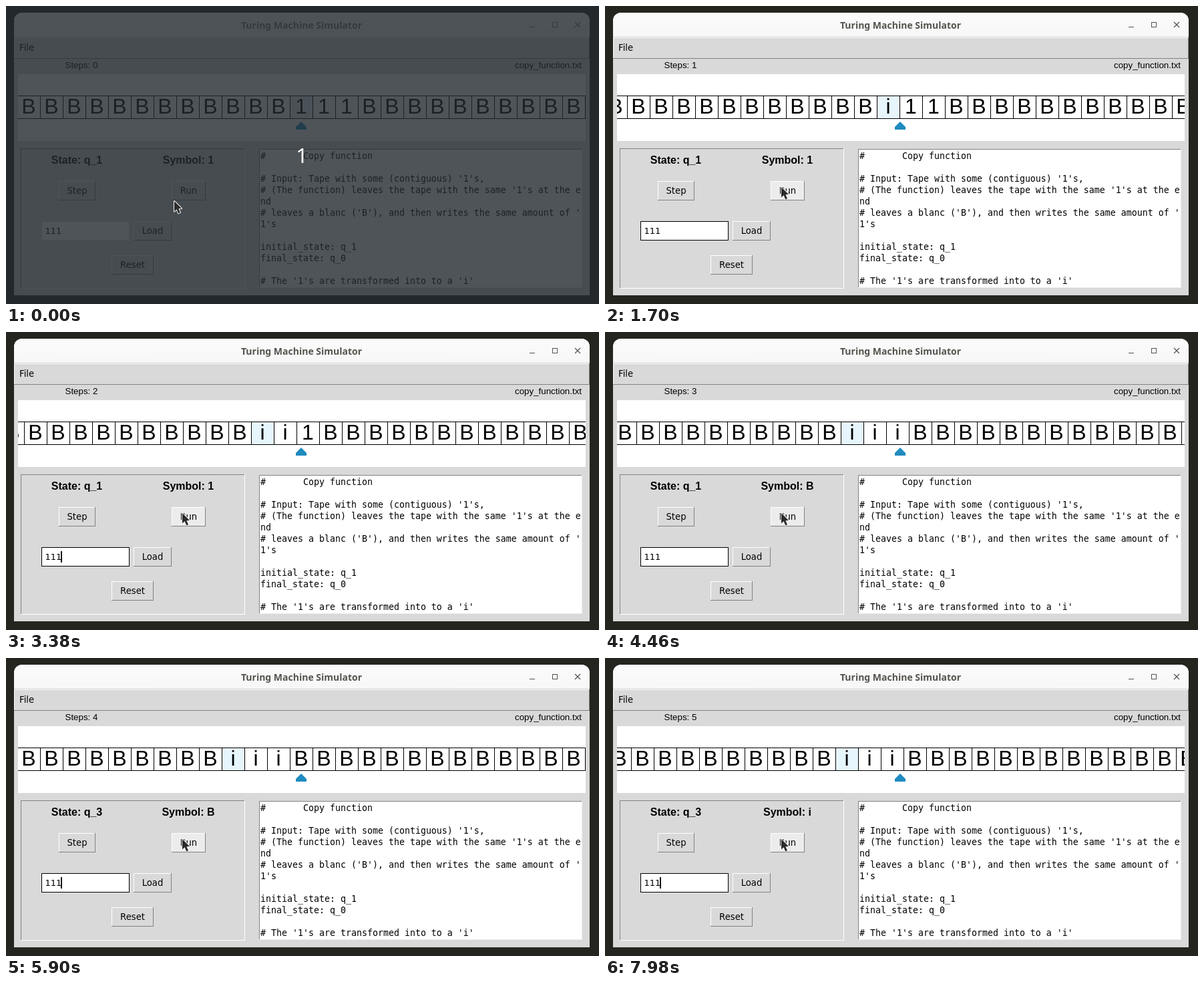
These frames come from a looping animation (888x446 px, 8000 ms). An HTML page with a canvas:

```html
<!DOCTYPE html>
<html lang="en">
<head>
<meta charset="utf-8">
<title>Turing Machine Simulator</title>
<style>
  html, body { margin: 0; width: 100%; height: 100%; overflow: hidden; background: #24251f; }
  canvas { display: block; }
</style>
</head>
<body>
<canvas id="stage" width="888" height="446"></canvas>
<script>
const ctx = document.getElementById('stage').getContext('2d');
const LOOP = 8000;
const FACE = '#d9d9d9', SHADE = '#828282', LIGHT = '#ffffff';
const SANS = '"Liberation Sans", sans-serif';
const UI = '13.2px "DejaVu Sans", sans-serif';
const MONO = '13.29px "DejaVu Sans Mono", monospace';
const CELL = 34, HEAD_LEFT = 425;

const PROGRAM = [
  '#       Copy function',
  '',
  "# Input: Tape with some (contiguous) '1's,",
  "# (The function) leaves the tape with the same '1's at the e",
  'nd',
  "# leaves a blanc ('B'), and then writes the same amount of '",
  "1's",
  '',
  'initial_state: q_1',
  'final_state: q_0',
  '',
  "# The '1's are transformed into to a 'i'"
];

// Each machine step: when the labels change, when the tape starts, its direction.
const STEPS = [
  { at: 1280, roll: 1240, dir: -1, state: 'q_1', symbol: '1' },
  { at: 2820, roll: 2780, dir: -1, state: 'q_1', symbol: '1' },
  { at: 4360, roll: 4340, dir: -1, state: 'q_1', symbol: 'B' },
  { at: 5900, roll: 5900, dir: 0, state: 'q_3', symbol: 'B' },
  { at: 7440, roll: 7430, dir: 1, state: 'q_3', symbol: 'i' }
];

const clamp = (v, lo, hi) => Math.min(hi, Math.max(lo, v));

function rect(x, y, w, h, color) {
  ctx.fillStyle = color;
  ctx.fillRect(x, y, w, h);
}

function text(str, x, y, font, color = '#000', align = 'left') {
  ctx.font = font;
  ctx.fillStyle = color;
  ctx.textAlign = align;
  ctx.fillText(str, x, y);
}

function polygon(points, color) {
  ctx.beginPath();
  points.forEach(([x, y]) => ctx.lineTo(x, y));
  ctx.closePath();
  ctx.fillStyle = color;
  ctx.fill();
}

// Box with one-pixel relief edges.
function relief(x, y, w, h, face, topLeft, bottomRight) {
  rect(x, y, w, h, bottomRight);
  rect(x, y, w - 1, h - 1, topLeft);
  rect(x + 1, y + 1, w - 2, h - 2, face);
}

function button(label, x, y, w, h, hover = false, pressed = false) {
  const edges = pressed ? [SHADE, LIGHT] : [LIGHT, SHADE];
  const shift = pressed ? 1 : 0;
  relief(x, y, w, h, hover ? '#ececec' : FACE, ...edges);
  text(label, x + w / 2 + shift, y + 19 + shift, UI, '#000', 'center');
}

function drawWindow(focused) {
  rect(0, 0, 888, 446, '#24251f');
  ctx.beginPath();
  ctx.roundRect(12, 10, 862, 423, [12, 12, 0, 0]);
  ctx.fillStyle = FACE;
  ctx.fill();

  const bar = ctx.createLinearGradient(0, 10, 0, 46);
  bar.addColorStop(0, '#fbfbfb');
  bar.addColorStop(1, '#f7f7f7');
  ctx.beginPath();
  ctx.roundRect(12, 10, 862, 36, [12, 12, 0, 0]);
  ctx.fillStyle = bar;
  ctx.fill();
  rect(12, 46, 862, 1, '#cfcfcf');

  const ink = focused ? '#55534e' : '#7c7b78';
  text('Turing Machine Simulator', 442.5, 34, 'bold 14px "Noto Sans", sans-serif', ink, 'center');
  rect(784, 31, 8, 1, ink);
  ctx.strokeStyle = ink;
  ctx.lineWidth = 1;
  ctx.strokeRect(818.5, 24.5, 7, 7);
  ctx.lineWidth = 1.2;
  ctx.beginPath();
  ctx.moveTo(852, 24); ctx.lineTo(860, 32);
  ctx.moveTo(860, 24); ctx.lineTo(852, 32);
  ctx.stroke();

  relief(12, 47, 862, 32, FACE, LIGHT, SHADE);
  text('File', 20, 67, UI);
}

function drawTape(written, offset) {
  rect(18, 102, 850, 100, '#fff');
  ctx.save();
  ctx.beginPath();
  ctx.rect(18, 102, 850, 100);
  ctx.clip();
  for (let i = -15; i <= 18; i++) {
    const x = HEAD_LEFT + i * CELL + offset;
    if (i === 0) rect(x, 134, CELL, 34, '#e7f5fc');
    rect(x, 134, 1, 35, '#000');
    const symbol = i < 0 || i > 2 ? 'B' : i < written ? 'i' : '1';
    text(symbol, x + 17, 161, '32px ' + SANS, '#000', 'center');
  }
  rect(18, 134, 850, 1, '#000');
  rect(18, 168, 850, 1, '#000');
  ctx.restore();
  polygon([[442, 173], [450, 181], [450, 185], [434, 185], [434, 181]], '#1f8bbf');
}

function drawControls(state, symbol, focused, caret, hover, pressed) {
  relief(22, 213, 336, 210, FACE, SHADE, LIGHT);
  const bold = 'bold 16px ' + SANS;
  text('State: ' + state, 106, 236, bold, '#000', 'center');
  text('Symbol: ' + symbol, 273, 236, bold, '#000', 'center');
  button('Step', 79, 262, 55, 29);
  button('Run', 248, 262, 51, 29, hover, pressed);
  rect(53, 322, 132, 29, focused ? '#000' : FACE);
  rect(54, 323, 130, 27, '#fff');
  text('111', 58.5, 341, '13px "DejaVu Sans", sans-serif');
  if (caret) rect(82, 328, 2, 17, '#000');
  button('Load', 191, 322, 57, 29);
  button('Reset', 158, 373, 63, 29);
}

function drawProgram() {
  relief(379, 214, 484, 208, '#fff', SHADE, '#ececec');
  PROGRAM.forEach((line, i) => text(line, 381, 229 + i * 17, MONO));
}

function drawCountdown(opacity) {
  ctx.globalAlpha = opacity;
  rect(0, 0, 888, 446, 'rgba(36, 42, 48, 0.8)');
  text('1', 443, 235, '31px "Noto Sans", sans-serif', '#fff', 'center');
  ctx.globalAlpha = 1;
}

function drawCursor(x, y) {
  ctx.save();
  ctx.translate(x, y);
  ctx.lineJoin = 'round';
  ctx.lineWidth = 2;
  ctx.strokeStyle = '#f4f4f4';
  const arrow = [[0, 0], [0, 15.5], [3.6, 12.2], [6.3, 18.4], [9, 17.2], [6.4, 11.2], [11, 11]];
  polygon(arrow, '#2b2b2b');
  ctx.stroke();
  polygon(arrow, '#2b2b2b');
  ctx.restore();
}

function draw(t) {
  const done = STEPS.filter(s => t >= s.at);
  const { state, symbol } = done.at(-1) || { state: 'q_1', symbol: '1' };
  // The tape moves one cell in 2-pixel ticks of 50 ms.
  const offset = STEPS.reduce((sum, s) =>
    sum + s.dir * 2 * clamp(Math.floor((t - s.roll) / 50), 0, 17), 0);

  const focused = t >= 20;
  const caret = focused && (t - 20) % 2520 < 1680;
  const p = clamp((t - 120) / 460, 0, 1);
  const glide = p * p * (3 - 2 * p);
  const mouseX = 252 + 12 * glide, mouseY = 292 - 21 * glide;

  drawWindow(focused);
  text('Steps: ' + done.length, 88.5, 93, '13.33px ' + SANS);
  text('copy_function.txt', 862, 93, '13.33px ' + SANS, '#000', 'right');
  drawTape(Math.min(done.length, 3), offset);
  drawControls(state, symbol, focused, caret, mouseY < 291, t >= 860 && t < 960);
  drawProgram();
  const veil = 1 - clamp((t - 10) / 150, 0, 1);
  if (veil > 0) drawCountdown(veil);
  drawCursor(mouseX, mouseY);
}

const start = performance.now();
function frame() {
  draw((performance.now() - start) % LOOP);
  requestAnimationFrame(frame);
}
frame();
</script>
</body>
</html>
```
